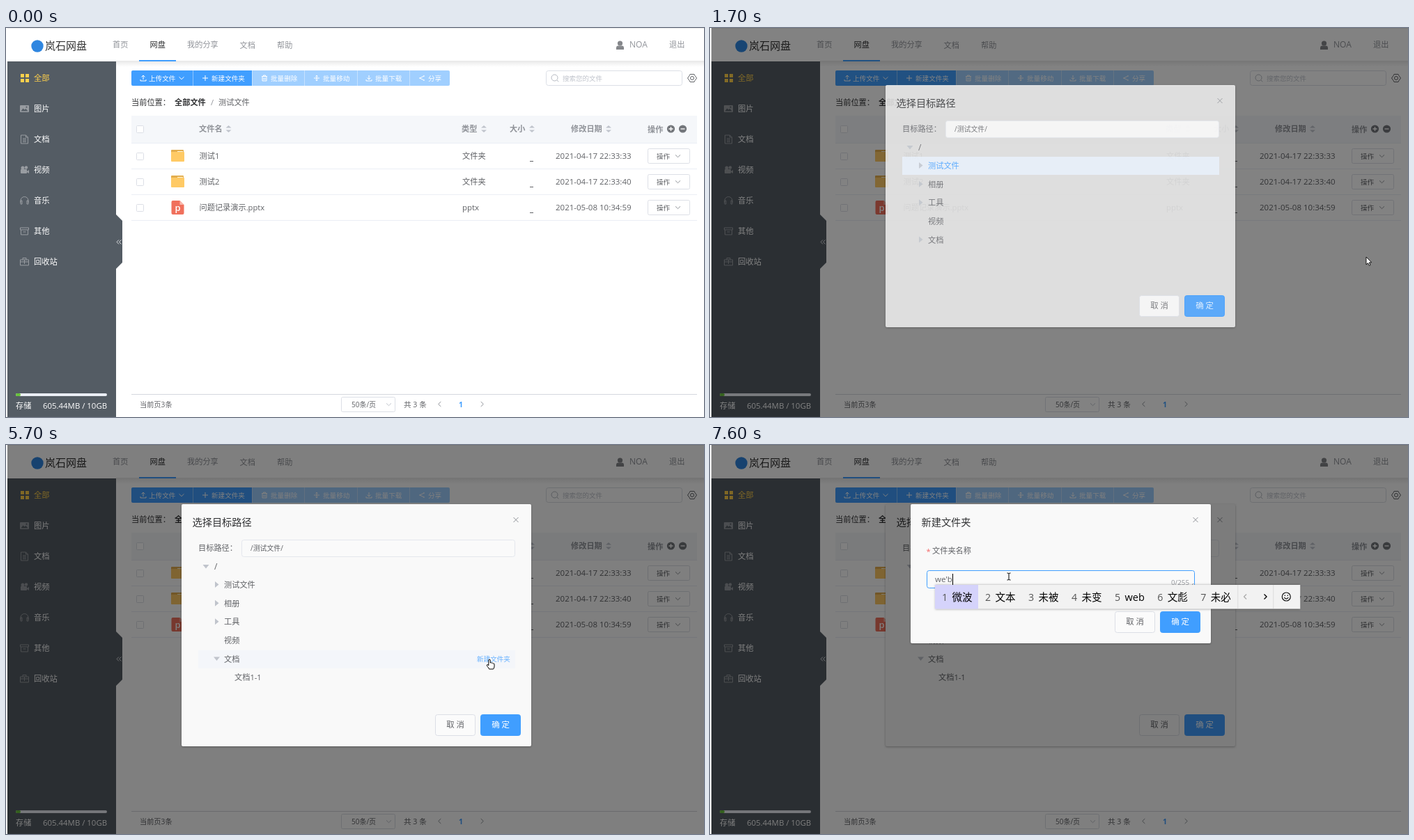
An HTML page with a canvas for the animation above (8000 ms loop, 1002 by 559 pixels).

```html
<!DOCTYPE html>
<html lang="zh-CN">
<head>
<meta charset="utf-8">
<title>网盘</title>
<style>
html, body { margin: 0; width: 100%; height: 100%; overflow: hidden; background: #fff; }
canvas { display: block; width: 100%; height: 100%; }
</style>
</head>
<body>
<canvas id="stage" width="1002" height="559"></canvas>
<script>
const ctx = document.getElementById('stage').getContext('2d');
const LOOP = 8000, STEP = 100;
const FONT = '"Open Sans", "Noto Sans CJK SC", "Noto Sans CJK", sans-serif';
const BLUE = '#409eff', TEXT = '#606266', DARK = '#303133', GRAY = '#909399',
  PALE = '#c0c4cc', EDGE = '#dcdfe6', RULE = '#ebeef5', SIDE = '#545c64';

const clamp = v => Math.max(0, Math.min(1, v));
const easeOut = v => 1 - (1 - clamp(v)) ** 2;
const smooth = v => v * v * (3 - 2 * v);

// y is the middle of the glyphs
function text(s, x, y, size = 11.2, color = TEXT, weight = 400, align = 'left') {
  ctx.font = `${weight} ${size}px ${FONT}`;
  ctx.textAlign = align;
  ctx.fillStyle = color;
  ctx.fillText(s, x, y + size * 0.37);
}

function rect(x, y, w, h, color) {
  ctx.fillStyle = color;
  ctx.fillRect(x, y, w, h);
}

function box(x, y, w, h, r, fill, edge) {
  ctx.beginPath();
  ctx.roundRect(edge ? x + 0.5 : x, edge ? y + 0.5 : y, edge ? w - 1 : w, edge ? h - 1 : h, r);
  if (fill) { ctx.fillStyle = fill; ctx.fill(); }
  if (edge) { ctx.lineWidth = 1; ctx.strokeStyle = edge; ctx.stroke(); }
}

function disc(x, y, r, color) {
  ctx.beginPath();
  ctx.arc(x, y, r, 0, 7);
  ctx.fillStyle = color;
  ctx.fill();
}

function icon(d, x, y, stroke, fill, width = 1) {
  const p = new Path2D(d);
  ctx.save();
  ctx.translate(x, y);
  ctx.lineWidth = width;
  ctx.lineJoin = 'round';
  if (fill) { ctx.fillStyle = fill; ctx.fill(p); }
  if (stroke) { ctx.strokeStyle = stroke; ctx.stroke(p); }
  ctx.restore();
}

const DOWN = 'M-3.5-1.7L0 1.7L3.5-1.7', PLUS = 'M-4 0H4M0-4V4', CROSS = 'M-3.5-3.5L3.5 3.5M3.5-3.5L-3.5 3.5',
  LEFT = 'M1.8-3.5L-1.8 0L1.8 3.5', RIGHT = 'M-1.8-3.5L1.8 0L-1.8 3.5',
  LENS = 'M4.5 0A4.5 4.5 0 1 1-4.5 0A4.5 4.5 0 1 1 4.5 0M3.3 3.3L5.8 5.8';

const TOOLS = [
  [180, 89, '上传文件', 205, 197, 'M0 2V-4M-2.5-1.5L0-4L2.5-1.5M-4 2V4H4V2'],
  [269, 85, '新建文件夹', 295, 286, PLUS],
  [354, 75, '批量删除', 380, 371, 'M-4-2.5H4M-1.5-2.5V-4H1.5V-2.5M-3-2.5V4H3V-2.5M-1-.5V2.5M1-.5V2.5'],
  [429, 76, '批量移动', 455, 446, PLUS + 'M-1.5-2.5L0-4L1.5-2.5M-1.5 2.5L0 4L1.5 2.5'],
  [505, 75, '批量下载', 530, 521, 'M0-4V2M-2.5-.5L0 2L2.5-.5M-4 2V4H4V2'],
  [580, 57, '分享', 606, 597, 'M3-3L-3 0L3 3M2-3H4M2 3H4M-4 0H-2']
];

const SIDEBAR = [
  ['全部', ''],
  ['图片', ''],
  ['文档', 'M-5-6H2L5-3V6H-5ZM2-6V-3H5M-2.5-1H2.5M-2.5 1.2H2.5M-2.5 3.4H2.5'],
  ['视频', ''],
  ['音乐', 'M-5.5 3V0A5.5 5.5 0 0 1 5.5 0V3M-5.5 0H-3.5V5H-5.5ZM3.5 0H5.5V5H3.5Z'],
  ['其他', 'M-6-5H6V-2H-6ZM-5-2V5H5V-2M-2 1H2'],
  ['回收站', 'M-6-3H6V5H-6ZM-2.5-3V-5.5H2.5V-3M-6 0H6M0-3V3']
];

function header() {
  rect(0, 0, 1002, 559, '#fff');
  const g = ctx.createLinearGradient(0, 47, 0, 56);
  g.addColorStop(0, 'rgba(0,0,0,.09)');
  g.addColorStop(1, 'rgba(0,0,0,0)');
  rect(158, 47, 844, 9, g);
  rect(2, 0, 1000, 1, '#eee');
  disc(45, 26, 8.7, '#2f86e0');
  text('岚石网盘', 56, 25, 15, '#333');
  text('首页', 153, 24, 11.2, GRAY);
  text('网盘', 206.5, 24, 11.2, DARK);
  text('我的分享', 260, 24, 11.2, GRAY);
  text('文档', 335.5, 25, 11.2, GRAY);
  text('帮助', 389, 25, 11.2, GRAY);
  rect(191, 46, 53, 2, BLUE);
  disc(881.5, 22, 3.6, '#85878b');
  icon('M-5.5 4.5V2Q-5.5-1-2.5-1H2.5Q5.5-1 5.5 2V4.5Z', 881.5, 26.5, null, '#85878b');
  text('NOA', 895, 24, 12, GRAY);
  text('退出', 952, 24, 11.2, GRAY);
}

function sidebar() {
  rect(2, 48, 156, 511, SIDE);
  icon('M0 0L9 9V69L0 78Z', 158, 268, null, SIDE);
  icon('M0-3L-3 0L0 3M3.5-3L.5 0L3.5 3', 162, 307.5, '#e4e6e8');
  SIDEBAR.forEach(([label, d], i) => {
    const y = 72 + 44 * i;
    text(label, 40, y, 11.3, i ? '#fff' : '#ffd04b');
    if (d) icon(d, 26.5, y, '#989ca1');
  });
  for (let i = 0; i < 4; i++) rect(21 + 7 * (i % 2), 66 + 7 * (i >> 1), 5, 5, '#ffd04b');
  box(20, 111, 13, 10, 1, '#989ca1');
  icon('M-5 3L-2-1L0 1L2-.5L5 3Z', 26.5, 116.5, null, SIDE);
  disc(29.5, 113.7, 1.1, SIDE);
  disc(24, 201, 2.5, '#989ca1');
  disc(29, 200.5, 2.2, '#989ca1');
  box(21, 203, 9, 6, 1, '#989ca1');
  icon('M0 0L3-2V3L0 1Z', 30, 206, null, '#989ca1');
  box(14, 525, 131, 4, 2, RULE);
  box(14, 525, 7, 4, 2, '#67c23a');
  text('存储', 14, 543, 11.2, '#fff');
  text('605.44MB / 10GB', 53, 543, 11.4, '#fff');
}

function toolbar() {
  TOOLS.forEach(([x, w, label, tx, ix, d], i) => {
    const r = i === 0 ? [2, 0, 0, 2] : i === 5 ? [0, 2, 2, 0] : 0;
    box(x, 61, w, 22, r, i < 2 ? BLUE : '#a0cfff');
    if (i) rect(x - 1, 61, 1, 22, i < 2 ? '#8cc5ff' : '#c6e2ff');
    text(label, tx, 72, 9.6, '#fff');
    icon(d, ix, 72, '#fff');
  });
  icon(DOWN, 252, 72, '#fff');
  box(775, 61, 196, 22, 3, '#fff', EDGE);
  icon(LENS, 787.5, 71.5, '#b4b8c0');
  text('搜索您的文件', 799, 72, 9.5, PALE);
  icon('M-3-5.5L3-5.5L4-3.5L6.5 0L4 3.5L3 5.5H-3L-4 3.5L-6.5 0L-4-3.5ZM2.5 0A2.5 2.5 0 1 1-2.5 0A2.5 2.5 0 1 1 2.5 0', 985, 72, TEXT);
  text('当前位置：', 180, 107, 11.2, DARK);
  text('全部文件', 242, 107, 11.2, DARK, 700);
  text('/', 294, 107, 11.2, GRAY);
  text('测试文件', 305, 107);
}

function sorter(x) {
  icon('M-4-1.5L0-5L4-1.5ZM-4 1.5L0 5L4 1.5Z', x, 145, null, PALE);
}

function actionButton(y, hot, fill) {
  box(921, y - 11, 61, 22, 2, hot ? '#ecf5ff' : fill, hot ? '#c6e2ff' : EDGE);
  text('操作', 934, y, 9.6, hot ? BLUE : TEXT);
  icon(DOWN, 964.5, y, hot ? BLUE : GRAY);
}

function table(t) {
  rect(180, 126, 812, 39, '#f5f7fa');
  const hover = t >= 500 && t < 1600;
  if (hover) rect(180, 203, 812, 73, '#f9f9f9');
  [165, 202, 239, 276].forEach(y => rect(180, y, 812, 1, RULE));
  [['文件名', 277, 319.5], ['类型', 654, 686], ['大小', 723, 755], ['修改日期', 811, 865]].forEach(([s, x, sx]) => {
    text(s, x, 145, 11.2, GRAY, 700);
    sorter(sx);
  });
  text('操作', 921, 145.5, 11.2, GRAY, 700);
  [954.5, 971.5].forEach((x, i) => {
    disc(x, 145, 5.6, '#73767b');
    icon(i ? 'M-3 0H3' : 'M-3 0H3M0-3V3', x, 145, '#fff', null, 1.3);
  });
  box(187, 140, 11, 11, 1, '#fff', EDGE);

  const rows = [
    ['测试1', '文件夹', '2021-04-17 22:33:33'],
    ['测试2', '文件夹', '2021-04-17 22:33:40'],
    ['问题记录演示.pptx', 'pptx', '2021-05-08 10:34:59']
  ];
  rows.forEach(([name, type, date], i) => {
    const y = 184 + 37 * i;
    box(187, y - 5, 11, 11, 1, '#fff', EDGE);
    if (i < 2) {
      box(237, y - 9, 18, 10, 1, '#e3ae4e');
      rect(246, y - 7, 8, 1, '#fff3d6');
      box(237, y - 6, 19, 14, 1, '#ffca65');
    } else {
      icon('M2 0H12L18 6V18Q18 20 16 20H2Q0 20 0 18V2Q0 0 2 0Z', 237.5, 248, null, '#f0705c');
      icon('M0 0L6 6H0Z', 249.5, 248, null, '#f9b8ac');
      text('p', 246.5, 258.5, 13, '#fff', 600, 'center');
    }
    text(name, 277.5, y);
    text(type, 655, y, i < 2 ? 11.2 : 11.4);
    rect(752, y + 7, 5, 1, TEXT);
    text(date, 789, y, 11.5);
    actionButton(y, i === 2 && t >= 600 && t < 1600, hover && i ? '#f9f9f9' : '#fff');
  });
}

function pager() {
  rect(180, 526, 812, 1, '#d5d8de');
  text('当前页3条', 192, 541, 10.2);
  box(481, 530, 78, 22, 2, '#fff', EDGE);
  text('50条/页', 496, 541, 10);
  icon(DOWN, 549.5, 541, PALE);
  text('共 3 条', 571, 541, 10.6);
  icon(LEFT, 622.5, 540.5, GRAY);
  text('1', 653, 541, 10.4, BLUE, 700, 'center');
  icon(RIGHT, 683.5, 540.5, GRAY);
}

function menu(t, pos) {
  if (t < 900 || t >= 1600) return;
  const p = easeOut((t - 800) / 300);
  ctx.save();
  ctx.globalAlpha = p;
  ctx.translate(0, 278);
  ctx.scale(1, p);
  ctx.translate(0, -278);
  box(907, 278, 83, 168, [0, 0, 10, 10], '#f8f8f8');
  box(916, 278, 65, 153, 2, '#fff', RULE);
  icon('M-5 5L0 0L5 5Z', 951, 273, null, '#fff');
  rect(917, 287, 63, 28, '#f8f8f8');
  rect(917, 372, 63, 7, '#f6f6f6');
  const hot = Math.floor((pos.y - 287) / 28.4);
  ['删除', '移动', '重命名', '分享', '下载'].forEach((s, i) => {
    const y = 300.5 + 28.2 * i;
    if (i === hot) rect(916, y - 13, 65, 27, '#e8f3ff');
    text(s, 932, y, 11.2, i === hot ? BLUE : TEXT);
  });
  ctx.restore();
}

function panel(x, y, w, h, title, p, body) {
  if (p <= 0) return;
  ctx.save();
  ctx.globalAlpha = p;
  ctx.translate(0, Math.round(-16 * (1 - p)));
  ctx.save();
  ctx.shadowColor = 'rgba(0,0,0,.3)';
  ctx.shadowBlur = 3;
  ctx.shadowOffsetY = 1;
  box(x, y, w, h, 2, '#f9f9f9');
  ctx.restore();
  text(title, x + 15.5, y + 26, 14.2, DARK);
  icon(CROSS, x + w - 22, y + 22.5, GRAY);
  [['取 消', 138.5, '#fbfbfb', EDGE, TEXT], ['确 定', 73, BLUE, BLUE, '#fff']].forEach(([s, dx, fill, edge, color]) => {
    const bx = Math.round(x + w - dx);
    box(bx, y + h - 46, 58, 31, 3, fill, edge);
    text(s, bx + 29, y + h - 31, 11.4, color, 400, 'center');
  });
  body();
  ctx.restore();
}

function twisty(x, y, turn) {
  ctx.save();
  ctx.translate(x, y);
  ctx.rotate(turn * Math.PI / 2);
  icon('M-2.5-4.5L3 0L-2.5 4.5Z', 0, 0, null, PALE);
  ctx.restore();
}

function pathDialog(t, pos) {
  panel(252, 85, 502, 348, '选择目标路径', easeOut((t - 1527) / 300), () => {
    text('目标路径：', 276, 148);
    box(338, 136, 393, 25, 3, '#fafafa', '#e4e7ed');
    text('/测试文件/', 351, 148.5, 9.9);
    twisty(287, 174.5, 1);
    text('/', 299, 174.5, 12);
    const open = easeOut((t - 3500) / 400);
    const inTree = t >= 1800 && t < 5900 && pos.x > 276 && pos.x < 731;
    const hot = inTree ? Math.floor((pos.y - 188) / 26.7) : -1;
    ['测试文件', '相册', '工具', '视频', '文档', '文档1-1'].forEach((s, i) => {
      if (i === 5 && !open) return;
      const y = 201 + 26.65 * i, picked = i === 0 && t < 1900;
      const base = ctx.globalAlpha;
      if (i === 5) ctx.globalAlpha = base * open;
      if (picked || i === hot) rect(276, Math.round(y - 13), 455, 26, picked ? '#e9f2fd' : '#f4f6fa');
      if (i !== 3 && i < 5) twisty(302.5, y - 0.5, i === 4 ? open : 0);
      text(s, i === 5 ? 328 : 313, y, 11.2, picked ? BLUE : TEXT);
      if (i === hot) text('新建文件夹', 676, y, 9.6, pos.x > 676 ? '#66b1ff' : BLUE);
      ctx.globalAlpha = base;
    });
  });
}

function nameDialog(t) {
  const typed = t < 7400 ? '' : t < 7500 ? 'w' : t < 7600 ? 'we' : "we'b";
  panel(288, 85, 431, 200, '新建文件夹', easeOut((t - 5912) / 300), () => {
    text('*', 310.5, 153, 11.2, '#f56c6c');
    text('文件夹名称', 319, 152);
    box(311, 180, 385, 26, 3, '#fafafa', t >= 6600 ? BLUE : EDGE);
    if (typed) text(typed, 323, 193, 11.5);
    else text('请输入文件夹名称', 323, 193, 11.2, PALE);
    ctx.font = `400 11.5px ${FONT}`;
    const end = 323 + ctx.measureText(typed).width;
    if (typed || (t >= 6600 && t < 7100)) rect(Math.round(end), 185, 1, 16, '#000');
    text('0/255', 688, 197.5, 9.8, GRAY, 400, 'right');
    icon('M0 5L5 0M3 5L5 3', 689, 199, GRAY);
  });
  if (typed) candidates(typed);
}

function candidates(typed) {
  const words = {
    w: '我 为 玩 问 网 无 外',
    we: '为 未 位 问 微 文 喂',
    "we'b": '微波 文本 未被 未变 web 文彪 未必'
  }[typed].split(' ');
  ctx.font = `400 14.5px ${FONT}`;
  const widths = words.map(s => ctx.measureText(s).width + 33);
  const total = widths.reduce((a, b) => a + b, 0);
  ctx.save();
  ctx.shadowColor = 'rgba(0,0,0,.35)';
  ctx.shadowBlur = 3;
  rect(323, 201, total + 91, 34.5, '#f2f2f2');
  ctx.restore();
  rect(323, 201, widths[0], 34.5, '#d5d3fb');
  let x = 323;
  words.forEach((s, i) => {
    text(String(i + 1), x + 10, 218.5, 14.2, '#555');
    text(s, x + 24.5, 218.5, 14.5, '#000');
    x += widths[i];
  });
  rect(x + 1, 201, 1, 34, '#dcdcdc');
  rect(x + 52, 201, 1, 34, '#dcdcdc');
  icon(LEFT, x + 12, 218, '#aaa', null, 1.2);
  icon(RIGHT, x + 41, 218, '#000', null, 1.3);
  icon('M6 0A6 6 0 1 1-6 0A6 6 0 1 1 6 0M-3 1.2Q0 5 3 1.2M-2-2.5V-1M2-2.5V-1', x + 71, 218, '#111', null, 1.2);
}

const TRACK = [
  [100, 252, 88], [300, 600, 130], [500, 990, 225], [600, 950, 254], [800, 950, 256],
  [1000, 948, 270], [1400, 942, 329], [1700, 942, 329], [2400, 330, 285], [2600, 310, 304],
  [2700, 309, 304], [4000, 309, 304], [4600, 705, 307], [4900, 705, 307], [5100, 662, 333],
  [5300, 662, 333], [5700, 694, 308], [6100, 694, 308], [6700, 429, 189]
];

function pointer(t) {
  const i = TRACK.findIndex(k => k[0] > t);
  if (i < 1) {
    const [, x, y] = TRACK[i < 0 ? TRACK.length - 1 : 0];
    return { x, y };
  }
  const [t0, x0, y0] = TRACK[i - 1], [t1, x1, y1] = TRACK[i];
  const k = smooth((t - t0) / (t1 - t0));
  return { x: x0 + (x1 - x0) * k, y: y0 + (y1 - y0) * k };
}

const ARROW = 'M0 0V11L2.5 8.7L4.3 12.4L6 11.6L4.3 8L7.6 7.8Z';
const HAND = 'M-1.2 8V.8Q0-.8 1.2 .8V5Q2.6 4.2 3.4 5.4Q4.8 4.8 5.4 6Q7 5.6 7 7.2V10Q7 12 5.6 14H-.4Q-1 12.2-3.6 9.4Q-4.4 8-3 7.6Q-2 7.6-1.2 9Z';
const BEAM = 'M-2.5-5Q0-5 0-4Q0-5 2.5-5M0-4V4M-2.5 5Q0 5 0 4Q0 5 2.5 5';

function cursor(t, pos) {
  if (t < 100) return;
  const inTree = t >= 1800 && t < 5900 && pos.x < 731;
  if (t >= 6600) icon(BEAM, pos.x, pos.y, '#000');
  else if ((t >= 600 && t < 1600) || inTree) icon(HAND, pos.x, pos.y, '#000', '#fff');
  else icon(ARROW, pos.x, pos.y, '#000', '#fff', 0.9);
}

function dim(alpha) {
  if (alpha > 0) rect(2, 0, 1000, 559, `rgba(0,0,0,${alpha})`);
}

function draw(t) {
  const pos = pointer(t), nested = t >= 5900;
  header();
  sidebar();
  toolbar();
  table(t);
  pager();
  menu(t, pos);
  if (!nested) dim(0.5 * easeOut((t - 1527) / 200));
  pathDialog(t, pos);
  if (nested) {
    dim(0.5);
    nameDialog(t);
  }
  cursor(t, pos);
}

const start = performance.now();
function tick() {
  const t = (performance.now() - start) % LOOP;
  draw(Math.floor(t / STEP) * STEP);
  requestAnimationFrame(tick);
}
tick();
</script>
</body>
</html>
```
